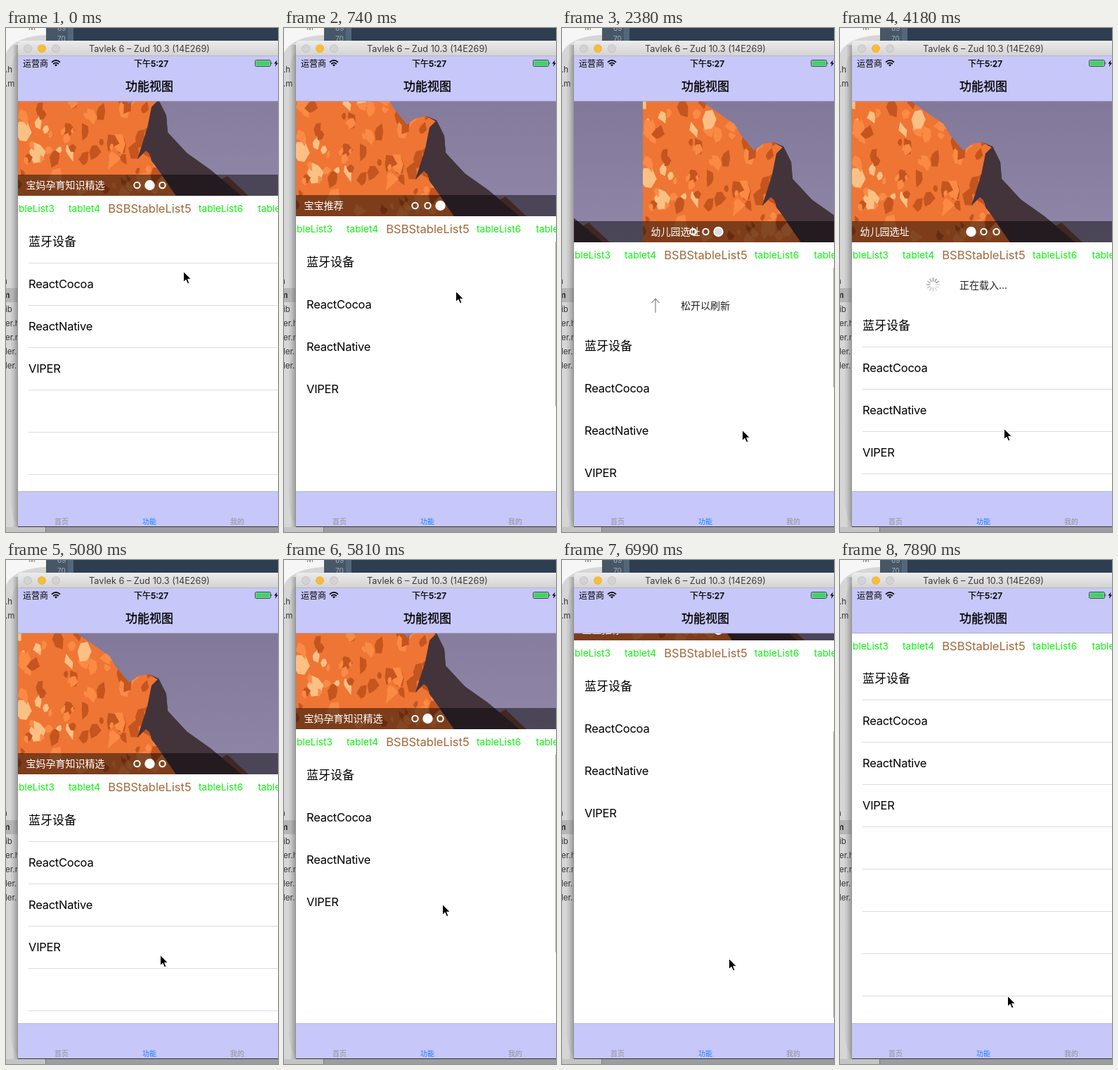
An HTML page for the animation above (8000 ms loop, 387x715 px).

```html
<!DOCTYPE html>
<html lang="zh">
<head>
<meta charset="utf-8">
<title>功能视图</title>
<style>
html, body { margin: 0; width: 100%; height: 100%; overflow: hidden; background: #fff; }
svg { display: block; }
text { font-family: Inter, "Noto Sans CJK SC", "Noto Sans CJK", sans-serif; white-space: pre; }
.mid { text-anchor: middle; }
.cell { font-size: 16.5px; letter-spacing: -.25px; }
.zh { font-size: 17px; letter-spacing: 0; }
.tab { font-size: 13.7px; fill: #0df20d; }
.cap { font-size: 14px; fill: #fff; }
.file { font-size: 11.5px; fill: #333; }
</style>
</head>
<body>
<svg id="stage" width="387" height="715" viewBox="0 0 387 715"></svg>
<script>
const LOOP = 8000, STEP = 149;
const stage = document.getElementById('stage');
const range = n => [...Array(n).keys()];
const poly = (fill, pts) => `<polygon fill="${fill}" points="${pts}"/>`;
const label = (x, y, s, attrs = '') => `<text x="${x}" y="${y}" ${attrs}>${s}</text>`;

let seed = 7;
const rnd = () => (seed = seed * 16807 % 2147483647) / 2147483647;

const captions = ['幼儿园选址', '宝妈孕育知识精选', '宝宝推荐'];
const cells = ['蓝牙设备', 'ReactCocoa', 'ReactNative', 'VIPER'];
const files = ['n', 'm', 'ib', 'er.h', 'er.m', 'ler.', 'ler.'];

// one irregular patch of the rock face
function facet() {
  const x = rnd() * 215, y = rnd() * 200, r = 4 + rnd() * 8, tone = rnd();
  const fill = x < 95 && tone < .2 ? '#fbc184' : tone < .45 ? '#c4551f' : '#fb8a45';
  const pts = range(6).map(i => {
    const a = i * Math.PI / 3, d = r * (.4 + rnd());
    return `${(x + d * Math.cos(a) * .8).toFixed(1)},${(y + d * Math.sin(a) * 1.2).toFixed(1)}`;
  });
  return poly(fill, pts.join(' '));
}

const ridge = '0,0 84,0 104,14 130,32 140,48 158,70 172,60 186,58 200,66 192,98 180,120 190,150 225,200 0,200';
const photo = `
  <rect width="375" height="200" fill="url(#sky)"/>
  ${poly('#7a4a42', '262,200 284,180 298,172 328,200')}
  ${poly('#43343b', '172,70 186,58 200,64 211,86 213,110 240,139 274,163 318,200 170,200')}
  <g clip-path="url(#ridge)">${poly('#ef7534', ridge)}${range(110).map(facet).join('')}</g>
  ${poly('#43343b', '190,74 200,64 211,86 213,110 240,139 256,160 206,156 182,136 170,148 184,104')}`;

stage.innerHTML = `
<defs>
  <linearGradient id="sky" x2="0" y2="1"><stop stop-color="#81789a"/><stop offset="1" stop-color="#8f86a8"/></linearGradient>
  <linearGradient id="bar" x2="0" y2="1"><stop stop-color="#ececec"/><stop offset="1" stop-color="#d2d2d2"/></linearGradient>
  <linearGradient id="shade"><stop stop-color="#000" stop-opacity="0"/><stop offset="1" stop-color="#000" stop-opacity=".25"/></linearGradient>
  <clipPath id="ridge"><polygon points="${ridge}"/></clipPath>
  <g id="photo">${photo}</g>
</defs>
<rect width="387" height="715" fill="#f6f6f6"/>
<rect x="57" width="330" height="20" fill="#2c3e50"/>
<rect x="57" width="39" height="20" fill="#465767"/>
<rect x="88" width="8" height="20" fill="#53677a"/>
${label(32, 3, 'M', 'font-size="11" fill="#777"')}
${[69, 70].map((n, i) => label(73, 4 + i * 15, n, 'font-size="10" fill="#a5b0b9"')).join('')}
<path d="M57 10C26 11 6 21 0 36V715H57Z" fill="#d6d6d6"/>
<path d="M57 17C30 18 10 28 7 62V672C8 694 14 704 24 709H57Z" fill="#cbcbcb"/>
<rect y="369" width="17" height="20" fill="#b5b5b5"/>
<rect x="9" y="24" width="8" height="684" fill="url(#shade)"/>
${['.h', '.m'].map((s, i) => label(-1, 63 + i * 20, s, 'class="file"')).join('')}
${files.map((s, i) => label(s.length > 1 ? -1 : -5, 363 + i * 20, s, `class="file" font-weight="${i === 1 ? 700 : 400}"`)).join('')}
<rect y="708" width="57" height="7" fill="#c4c4c4"/>
<rect x="57" y="707" width="330" height="8" fill="#9c9da0"/>
<rect x="56" y="707" width="1" height="8" fill="#777"/>
<path d="M17 40V23Q17 18 22 18H387V40Z" fill="url(#bar)"/>
<rect x="17" y="39" width="370" height="1" fill="#b8b8b8"/>
${['#d3d3d3', '#fdbc2e', '#d3d3d3'].map((c, i) =>
  `<circle cx="${31 + i * 20}" cy="29" r="5.6" fill="${c}" stroke="#000" stroke-opacity=".12" stroke-width=".8"/>`).join('')}
${label(204, 34, 'Tavlek 6 – Zud 10.3 (14E269)', 'class="mid" font-size="12.7" fill="#3c3c3c"')}

<svg x="17" y="104" width="370" height="553" overflow="hidden">
  <rect width="370" height="553" fill="#fff"/>
  <g id="head">
    <path id="arrow" d="M0 10V-10M-5.5 -4L0 -10L5.5 -4" fill="none" stroke="#777" stroke-width="1.1"/>
    <g id="spin" stroke="#666" stroke-width="1.8" stroke-linecap="round">
      ${range(12).map(i => `<path d="M0 -5V-9" transform="rotate(${i * 30})"/>`).join('')}
    </g>
    <text id="hint" class="mid" x="187" y="5" font-size="14" fill="#222"></text>
  </g>
  <g id="rows">
    ${cells.map((s, i) => label(15, i * 60 + 36, s, `class="cell${i ? '' : ' zh'}"`)).join('')}
    <g id="lines" fill="#dcdbe0">${range(10).map(i => `<rect x="15" y="${i * 60 + 60}" width="360" height="1"/>`).join('')}</g>
  </g>
  <rect id="thumb" x="369" width="3" fill="#8c8c8c"/>
  <g id="top">
    ${[0, 1].map(i => `<g id="page${i}"><use href="#photo"/><rect y="170" width="376" height="30" fill="#000" fill-opacity=".48"/>
      <text id="cap${i}" class="cap" x="11.5" y="190"></text></g>`).join('')}
    ${range(3).map(i => `<circle class="dot" cx="${169.5 + i * 18}" cy="185" r="4.2" stroke="#fff" stroke-width="2"/>`).join('')}
    <rect y="200" width="370" height="36" fill="#fff"/>
    ${label(52, 223, 'tableList3', 'class="tab" text-anchor="end"')}
    ${label(72, 223, 'tablet4', 'class="tab"')}
    ${label(187.5, 223.5, 'BSBStableList5', 'class="mid" font-size="16.5" fill="#a3683a"')}
    ${label(257, 223, 'tableList6', 'class="tab"')}
    ${label(341.5, 223, 'tableList7', 'class="tab"')}
  </g>
</svg>

<rect x="17" y="40" width="370" height="64" fill="#c7c7f9"/>
<rect x="17" y="103.5" width="370" height=".7" fill="#9d9cba"/>
<rect x="17" y="657" width="370" height="50" fill="#c7c7f9"/>
<rect x="17" y="657" width="370" height=".7" fill="#b5b4d6"/>
<rect x="17" y="707" width="370" height="1" fill="#33333d"/>
<rect x="16.3" y="40" width=".7" height="667" fill="#8e8e8e"/>
${label(24, 54.5, '运营商', 'font-size="12"')}
<g fill="none" stroke="#000" stroke-width="1.7">
  <path d="M65 48.6Q71 43.2 77 48.6M67.2 51Q71 47.6 74.8 51"/>
  <path d="M69 52.2Q71 50.6 73 52.2L71 54.4Z" fill="#000" stroke="none"/>
</g>
${label(206.5, 54.5, '下午5:27', 'class="mid" font-size="12" font-weight="500" stroke="#000" stroke-width=".25"')}
<rect x="354.5" y="45.5" width="22" height="9" rx="1.8" fill="#c7c7f9" stroke="#222" stroke-width=".8"/>
<rect x="355.6" y="46.6" width="19.8" height="6.8" rx=".8" fill="#3fd463"/>
<path d="M377.6 48.3Q379.3 50 377.6 51.7Z"/>
<path d="M385.6 45.5L381.5 50.6H384L382.8 55L387 49.4H384.6Z"/>
${label(204, 88.5, '功能视图', 'class="mid" font-size="17" font-weight="500" stroke="#000" stroke-width=".35"')}
${['首页', '功能', '我的'].map((s, i) =>
  label(79 + i * 125, 703.5, s, `class="mid" font-size="10" fill="${i === 1 ? '#1a80ff' : '#929292'}"`)).join('')}
<path id="mouse" d="M0 0V15L3.5 11.7L6 17.2L8.4 16.2L6.1 10.8H10.8Z" fill="#000" stroke="#fff" stroke-width="1" stroke-linejoin="round"/>`;

const el = id => document.getElementById(id);
const dots = [...document.querySelectorAll('.dot')];
const spokes = [...el('spin').children];
const clamp = (v, a, b) => Math.min(b, Math.max(a, v));
const move = (node, x, y) => node.setAttribute('transform', `translate(${x} ${y})`);
const show = (node, a) => node.setAttribute('opacity', a);

// keys: [step, value...], eased from each to the next
function track(keys, k) {
  let i = 0;
  while (i < keys.length - 2 && k >= keys[i + 1][0]) i++;
  const [a, b] = [keys[i], keys[i + 1]];
  const p = clamp((k - a[0]) / (b[0] - a[0]), 0, 1), e = p * p * (3 - 2 * p);
  return a.slice(1).map((v, j) => Math.round(v + (b[j + 1] - v) * e));
}

const mouseKeys = [[0, 252, 345], [5, 244, 373], [8, 216, 381], [9, 253, 249], [10, 253, 249], [16, 256, 570],
  [18, 251, 646], [28, 233, 568], [34, 219, 560], [36, 219, 560], [43, 233, 378], [49, 239, 630], [51, 240, 662], [53, 238, 618]];
const scrollKeys = [[0, 66], [5, 37], [8, 29], [10, 29], [16, -82], [18, -108], [22, -53], [30, -53], [34, 0],
  [36, 0], [43, 163], [49, 200], [51, 200], [53, 201]];
const scrollAt = k => track(scrollKeys, k)[0];

function carousel(ms) {
  const first = 200, gap = 1986, span = 300;
  const n = Math.floor((ms - first) / gap);
  const p = clamp((ms - first - n * gap) / span, 0, 1);
  const shift = Math.floor(375 * (1 - Math.cos(Math.PI * p)) / 2);
  const from = (n + 4) % 3, to = (from + 1) % 3;
  [[from, -shift], [to, 375 - shift]].forEach(([page, x], i) => {
    move(el('page' + i), x, 0);
    el('cap' + i).textContent = captions[page];
  });
  const on = p < 1 ? from : to, faded = p > 0 && p < 1;
  dots.forEach((d, i) => {
    d.setAttribute('r', i === on ? 6.2 : 4.2);
    d.setAttribute('fill', i === on ? (faded ? '#dedede' : '#fff') : 'none');
  });
}

function refresh(k, s) {
  const busy = k >= 19, ready = s <= -54;
  show(el('head'), s < 0 ? 1 : 0);
  move(el('head'), 0, 208 - s);
  el('hint').textContent = busy ? '正在载入...' : ready ? '松开以刷新' : '下拉可以刷新';
  show(el('arrow'), busy ? 0 : 1);
  el('arrow').setAttribute('transform', `translate(116 0) rotate(${ready ? 0 : 180})`);
  show(el('spin'), busy ? 1 : 0);
  move(el('spin'), 115.5, -1);
  const lead = Math.floor(k * STEP * 12 / 1000);
  spokes.forEach((p, i) => show(p, .12 + .5 * (1 - ((lead - i + 12) % 12) / 12)));
}

function draw(ms) {
  const k = Math.floor((ms + 30) / STEP), s = scrollAt(k);
  const resting = s === scrollAt(k - 1) || s === scrollAt(k + 1);
  const view = 553, ratio = view / (view + 201);

  move(el('mouse'), ...track(mouseKeys, k).map(v => v + .5));
  move(el('rows'), 0, 235 - s);
  move(el('top'), 0, -clamp(s, 0, 200));
  show(el('lines'), resting ? 1 : 0);
  show(el('thumb'), resting ? 0 : .7);
  el('thumb').setAttribute('y', Math.max(0, s) * ratio);
  el('thumb').setAttribute('height', view * ratio);
  refresh(k, s);
  carousel(k * STEP);
}

function tick() {
  draw(performance.now() % LOOP);
  requestAnimationFrame(tick);
}
tick();
</script>
</body>
</html>
```
